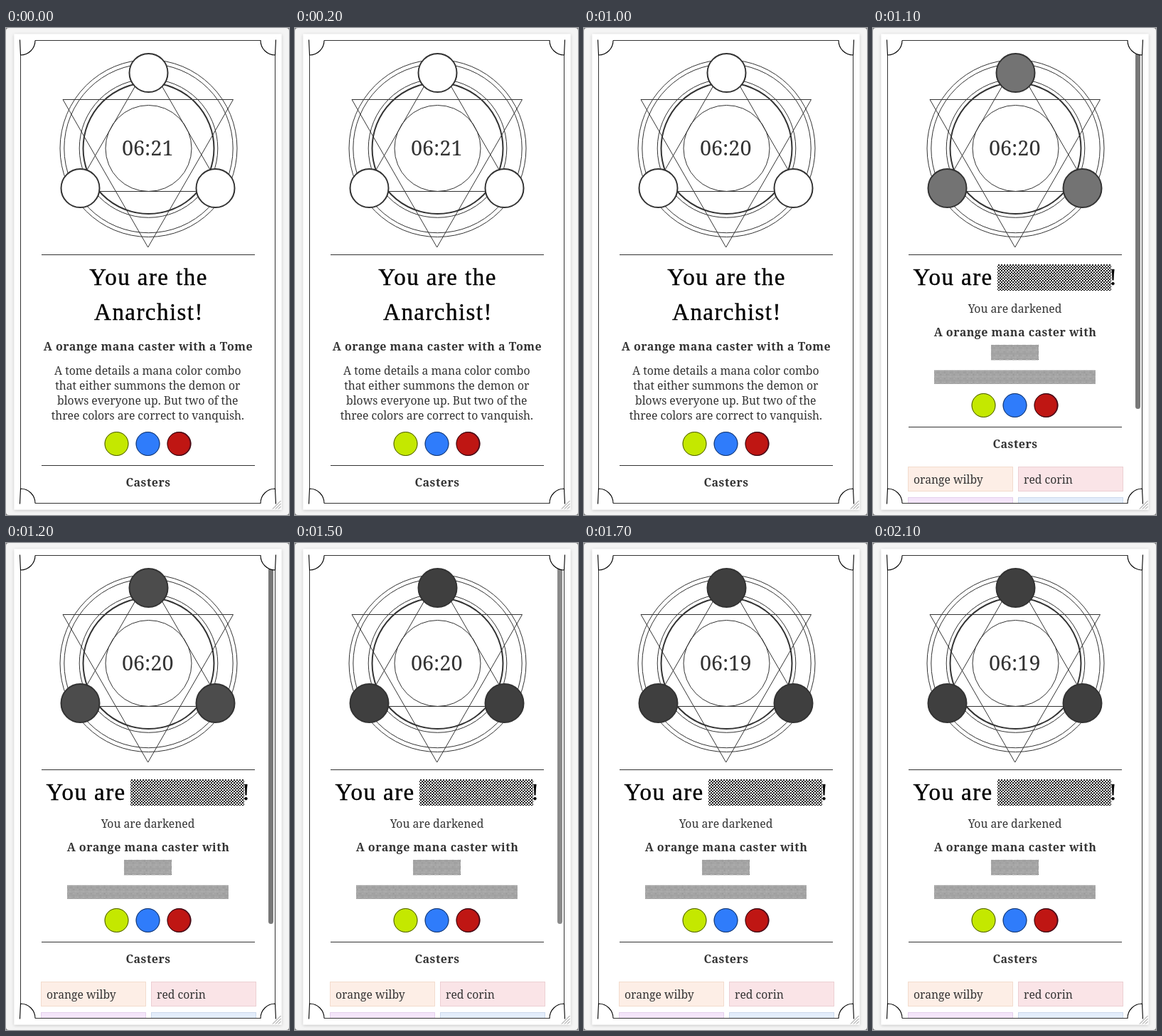
An HTML page that plays this animation: 398 by 684 pixels, repeating every 2.5 s.

```html
<!DOCTYPE html>
<html lang="en">
<head>
<meta charset="utf-8">
<title>Caster card</title>
<style>
html, body { margin: 0; width: 100%; height: 100%; overflow: hidden; background: #777; }
svg { display: block; width: 398px; height: 684px; }
text { font: 15.7px "Noto Serif", serif; fill: #333; }
.mid { text-anchor: middle; }
.title { font: 33px "Liberation Serif", serif; letter-spacing: 1.45px; fill: #000; stroke: #000; stroke-width: .4px; }
.bold { font-weight: 600; font-size: 16px; letter-spacing: .47px; }
.timer { font-size: 28.8px; }
.line { fill: none; stroke: #333; }
</style>
</head>
<body>
<svg viewBox="0 0 398 684">
  <defs>
    <filter id="shadow"><feDropShadow dx="0" dy="1" stdDeviation="2" flood-opacity=".2"/></filter>
    <clipPath id="inside"><path d="M20 17H379V667H20Z"/></clipPath>
    <g id="weave"><circle cx="1" cy="1" r="1.1"/><circle cx="3" cy="3" r="1.1"/></g>
    <pattern id="coarse" width="4" height="4" patternUnits="userSpaceOnUse"><use href="#weave"/></pattern>
    <pattern id="fine" width="4" height="4" patternUnits="userSpaceOnUse" patternTransform="scale(.56)"><use href="#weave" fill="#333"/></pattern>
    <g id="mana">
      <circle cx="155.5" r="17" fill="#c4e800"/>
      <circle cx="199.5" r="17" fill="#2f7cfb"/>
      <circle cx="243.5" r="17" fill="#7c1020"/>
      <circle cx="242.7" r="15.6" fill="#bf1613"/>
      <g fill="none" stroke="#000" stroke-opacity=".65">
        <circle cx="155.5" r="16.5"/>
        <circle cx="199.5" r="16.5"/>
        <circle cx="243.5" r="16.5"/>
      </g>
    </g>
  </defs>

  <rect width="398" height="684" rx="4" fill="#f4f4f4"/>
  <rect x="11.5" y="8.5" width="376" height="668" fill="#fff" filter="url(#shadow)"/>
  <path d="M375 675.5L386.5 664M379 675.5L386.5 668M383 675.5L386.5 672" stroke="#888" fill="none"/>

  <g class="line">
    <circle cx="200.5" cy="169" r="124.5"/>
    <circle cx="200.5" cy="169" r="118.7"/>
    <circle cx="200.5" cy="169" r="97.3"/>
    <circle cx="200.5" cy="169" r="92" stroke-width="2"/>
    <circle cx="200.5" cy="169" r="60.5"/>
    <path d="M80 100.5H319.5L199.7 308ZM200.5 49L96.5 229.5H304.5Z"/>
    <g id="orbs" stroke-width="2">
      <circle cx="200.5" cy="63" r="27"/>
      <circle cx="104.5" cy="225" r="27"/>
      <circle cx="294.5" cy="225" r="27"/>
    </g>
    <path d="M50 318.5H350"/>
  </g>
  <text id="timer" class="mid timer" x="199.2" y="179"></text>

  <g id="clear">
    <text class="mid title" x="200.5" y="361">You are the</text>
    <text class="mid title" x="201" y="410">Anarchist!</text>
    <text class="mid bold" x="200" y="453">A orange mana caster with a Tome</text>
    <text class="mid" x="199.3" y="487">A tome details a mana color combo</text>
    <text class="mid" x="199.3" y="508">that either summons the demon or</text>
    <text class="mid" x="199.3" y="529">blows everyone up. But two of the</text>
    <text class="mid" x="199.3" y="550">three colors are correct to vanquish.</text>
    <use href="#mana" y="584"/>
    <path class="line" d="M50 614.5H350"/>
    <text class="mid bold" x="200" y="644">Casters</text>
  </g>

  <g id="dark" clip-path="url(#inside)">
    <text class="title" x="56.5" y="361">You are</text>
    <rect x="175" y="332" width="160" height="37" fill="url(#coarse)"/>
    <text class="title" x="332" y="361">!</text>
    <text class="mid" x="199.5" y="400">You are darkened</text>
    <text class="mid bold" x="200" y="432.5">A orange mana caster with</text>
    <rect x="166" y="445" width="67" height="21.5" fill="url(#fine)"/>
    <rect x="86" y="480.5" width="227" height="19.5" fill="url(#fine)"/>
    <use href="#mana" y="530"/>
    <path class="line" d="M50 560.5H350"/>
    <text class="mid bold" x="200" y="590">Casters</text>
    <rect x="49.5" y="616.5" width="147" height="34" fill="#fdeee6" stroke="#f3dccd"/>
    <rect x="204.5" y="616.5" width="147" height="34" fill="#fae4e7" stroke="#eccfd3"/>
    <rect x="49.5" y="659.5" width="147" height="34" fill="#f4e5fa" stroke="#e4d0ec"/>
    <rect x="204.5" y="659.5" width="147" height="34" fill="#e3edfb" stroke="#ccd9ec"/>
    <text x="57" y="640">orange wilby</text>
    <text x="212" y="640">red corin</text>
    <rect id="bar" x="369" y="30" width="7" height="505" rx="3.5"/>
  </g>

  <path class="line" d="M41 17.5H359M378.500 38V647M359 667.5H41M20.5 647V38"/>
  <g id="corners" fill="#fff" stroke="#000" stroke-width="1.1"></g>
</svg>
<script>
const $ = id => document.getElementById(id);
const show = (id, on) => $(id).setAttribute('visibility', on ? 'visible' : 'hidden');
const clamp = v => Math.min(1, Math.max(0, v));

// White quarter discs notch the corners and hide the content behind them
$('corners').innerHTML = [[20.5, 17.5, 1, 1], [378.5, 17.5, -1, 1], [20.5, 667.5, 1, -1], [378.5, 667.5, -1, -1]]
  .map(([x, y, sx, sy]) => `<path transform="translate(${x} ${y}) scale(${sx} ${sy})" d="M20.5 0A20.5 20.5 0 0 1 0 20.5L-1 -1"/>`)
  .join('');

function draw(now) {
  const t = Math.floor(now % 2500 / 100) * 100;
  const dark = t >= 1100;
  show('clear', !dark);
  show('dark', dark);
  $('timer').textContent = t < 500 ? '06:21' : t < 1700 ? '06:20' : '06:19';

  const shade = dark ? Math.round(63 + 52 * clamp((1300 - t) / 200) ** 2) : 255;
  $('orbs').setAttribute('fill', `rgb(${shade},${shade},${shade})`);
  $('bar').setAttribute('fill-opacity', Math.min(.53, .46 * clamp((1700 - t) / 200) + (t < 1500 ? .07 : 0)));
  requestAnimationFrame(draw);
}
requestAnimationFrame(draw);
</script>
</body>
</html>
```
